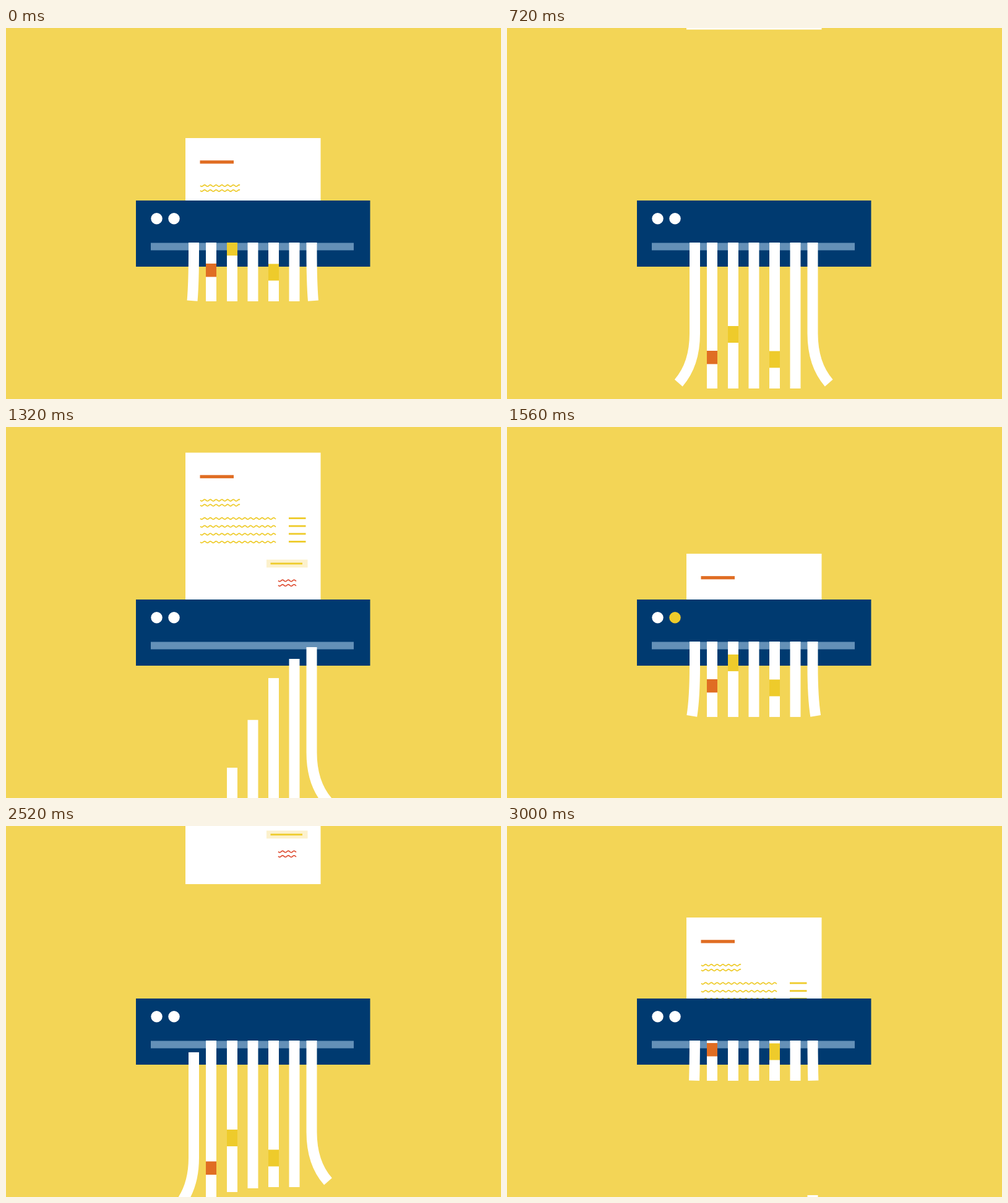
Recreate the animation shown at these times as an HTML page with a canvas. Size 800x600 px, loop 3040 ms.

```html
<!DOCTYPE html>
<html lang="en">
<head>
<meta charset="utf-8">
<title>Paper shredder</title>
<style>
html, body { margin: 0; height: 100%; overflow: hidden; background: #f3d556; }
canvas { display: block; }
</style>
</head>
<body>
<canvas id="stage" width="800" height="600"></canvas>
<script>
const ctx = document.getElementById('stage').getContext('2d');
const LOOP = 3040, CYCLE = 1520, FRAME = 40;
const YELLOW = '#eecb2b', ORANGE = '#e06d23', RED = '#df5238';
const SLOT = 347, BODY_TOP = 279, REST = 237, PAPER = 259.5;

// Top edge of a sheet over time: it slides in, then runs through the blades.
const track = [
  [600, -264], [720, -257], [840, -227], [1000, -165.5], [1140, -78],
  [1280, 17], [1320, 41.5], [1480, 148], [1520, 178], [1640, 250],
  [1760, 286.5], [1880, 304], [2080, 316], [2240, 319], [2320, 320]
];

// Strips: left edge, time the fall starts, fall strength, curl side, mark.
const strips = [
  { x: 295, start: 730, pull: 2.1, curl: -1 },
  { x: 323, start: 790, pull: 2.1, mark: [61, 21.5, ORANGE] },
  { x: 357, start: 844, pull: 2.1, mark: [101, 27, YELLOW] },
  { x: 390.5, start: 902, pull: 2.04 },
  { x: 424, start: 1005, pull: 2.61, mark: [60.5, 27, YELLOW] },
  { x: 457.5, start: 1115, pull: 5.86 },
  { x: 485.5, start: 1168, pull: 8.97, curl: 1 }
];
const WIDTH = 17;

const slope = i => (track[i + 1][1] - track[i][1]) / (track[i + 1][0] - track[i][0]);

function tangent(i) {
  if (i === 0 || i === track.length - 1) return 0;
  const a = slope(i - 1), b = slope(i);
  return 2 * a * b / (a + b);
}

// Smooth monotone interpolation along the track.
function sheetTop(t) {
  const last = track.length - 1;
  if (t <= track[0][0]) return track[0][1];
  if (t >= track[last][0]) return track[last][1];
  const i = track.findIndex(p => p[0] > t) - 1;
  const [t0, y0] = track[i], [t1, y1] = track[i + 1];
  const d = t1 - t0, s = (t - t0) / d, r = 1 - s;
  return y0 * (1 + 2 * s) * r * r + y1 * s * s * (3 - 2 * s)
    + d * s * r * (r * tangent(i) - s * tangent(i + 1));
}

function rect(x, y, w, h, color) {
  ctx.fillStyle = color;
  ctx.fillRect(x, y, w, h);
}

function dot(x, y, color) {
  ctx.fillStyle = color;
  ctx.beginPath();
  ctx.arc(x, y, 9.2, 0, 7);
  ctx.fill();
}

function wave(x0, x1, y, color) {
  ctx.beginPath();
  for (let x = x0; x <= x1; x++) ctx.lineTo(x, y + 1.3 * Math.sin((x - x0) * 2 * Math.PI / 9.3));
  ctx.strokeStyle = color;
  ctx.lineWidth = 1.7;
  ctx.stroke();
}

function clipped(y, h, draw) {
  ctx.save();
  ctx.beginPath();
  ctx.rect(0, y, 800, h);
  ctx.clip();
  draw();
  ctx.restore();
}

function drawSheet(top) {
  if (top >= BODY_TOP) return;
  clipped(0, BODY_TOP, () => {
    ctx.translate(0, top);
    rect(290, 0, 218.5, PAPER, '#fff');
    rect(313.5, 36.2, 54.5, 5.2, ORANGE);
    for (const y of [77, 85]) wave(314, 378, y, YELLOW);
    for (let i = 0; i < 4; i++) {
      wave(314, 436, 106.5 + 12.7 * i, YELLOW);
      rect(457, 104.7 + 12.6 * i, 27.5, 2.8, YELLOW);
    }
    rect(421, 173, 66.5, 12.8, '#fcf1cc');
    rect(427.5, 178, 51.5, 2.8, YELLOW);
    for (const y of [207, 214.5]) wave(440, 469, y, RED);
  });
}

function drawStrip(strip, length, fall) {
  const { x, curl, mark } = strip;
  const top = Math.max(SLOT, SLOT + fall - (PAPER - REST));
  const bottom = SLOT + length + fall;
  if (top >= 600) return;
  clipped(top, 600 - top, () => {
    if (curl) {
      const cx = x + WIDTH / 2;
      const bend = 26.5 * (length / REST) ** 2.6;
      const end = bottom - bend * 0.34;
      ctx.beginPath();
      ctx.moveTo(cx, Math.min(top, end - 80));
      ctx.lineTo(cx, end - 80);
      ctx.quadraticCurveTo(cx, end - 30, cx + curl * bend, end);
      ctx.strokeStyle = '#fff';
      ctx.lineWidth = WIDTH;
      ctx.stroke();
    } else {
      rect(x, top, WIDTH, bottom - top, '#fff');
    }
    if (mark) rect(x, bottom - mark[0], WIDTH, mark[1], mark[2]);
  });
}

function drawStrips(sheet, time) {
  const length = sheet - 83;
  if (length <= 0) return;
  for (const s of strips) {
    drawStrip(s, length, s.pull * 1e-6 * Math.max(0, time - s.start) ** 3);
  }
}

function draw(now) {
  const t = Math.floor(now % LOOP / FRAME) * FRAME;
  const u = t % CYCLE;
  const incoming = sheetTop(u), outgoing = sheetTop(u + CYCLE);

  rect(0, 0, 800, 600, '#f3d556');
  drawSheet(outgoing);
  drawSheet(incoming);

  rect(210, BODY_TOP, 378.5, 107, '#003a70');
  rect(234, 347.5, 328, 12, '#6490b7');
  dot(243.5, 308.3, '#fff');
  dot(271.5, 308.3, t % 600 >= 300 ? YELLOW : '#fff');

  drawStrips(outgoing, u);
  drawStrips(incoming, 0);
}

const begin = performance.now();
function tick() {
  draw(performance.now() - begin);
  requestAnimationFrame(tick);
}
tick();
</script>
</body>
</html>
```
